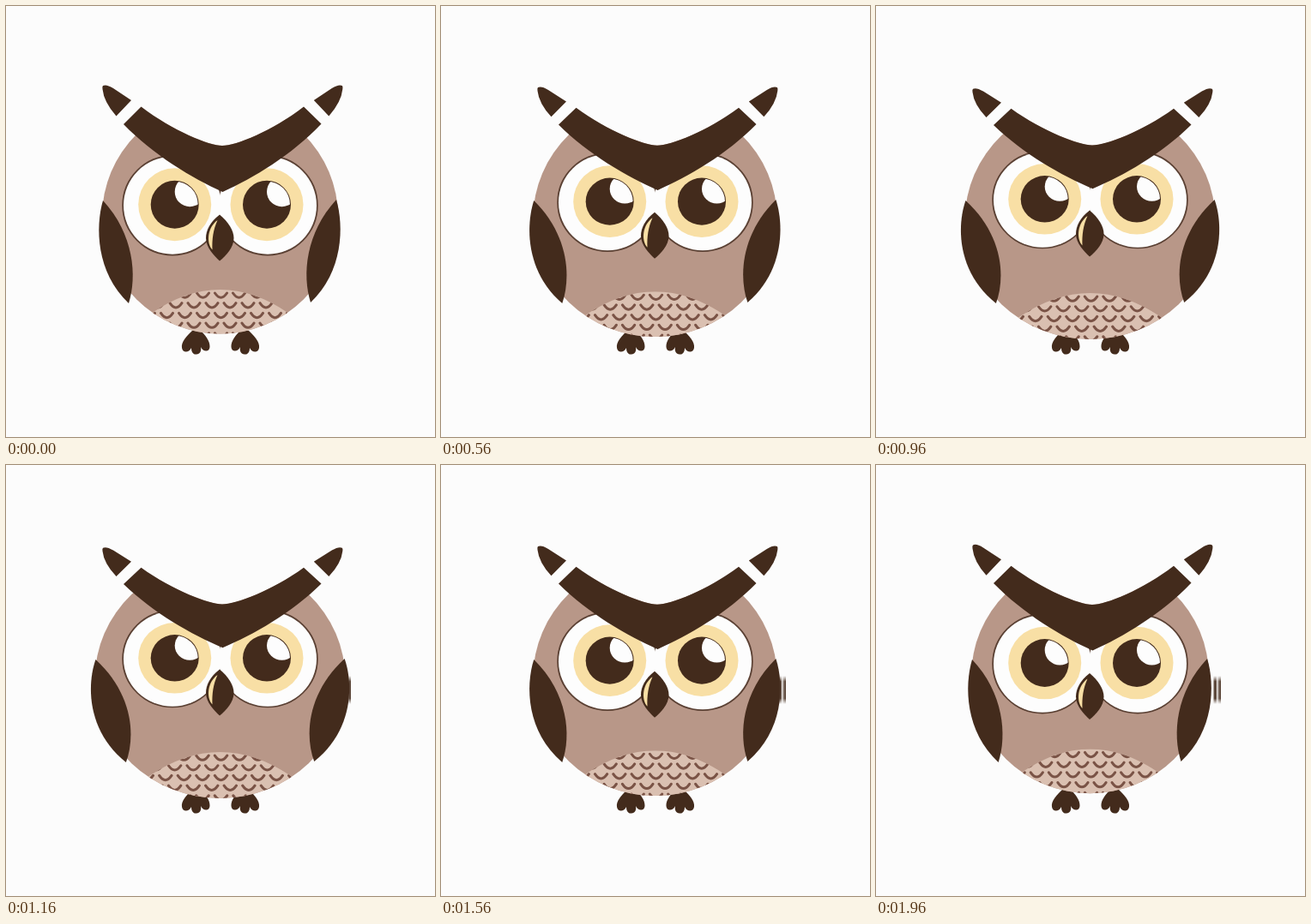
Recreate the animation shown at these times as an HTML page. Size 500 by 503 pixels, loop 2000 ms.

```html
<!DOCTYPE html>
<html lang="en">
<head>
<meta charset="utf-8">
<title>Breathing owl</title>
<style>
  html, body { margin: 0; width: 100%; height: 100%; overflow: hidden; background: #fcfcfc; }
  svg { display: block; width: 100vw; height: 100vh; }
  .dark { fill: #432b1c; }
  .cream { fill: #f8dfa5; }
  .white { fill: #fdfdfd; }
  .rim { fill: none; stroke: #5a4033; stroke-width: 3.4; }
  .scales { fill: none; stroke: #7a5346; stroke-width: 3; stroke-linecap: round; }
</style>
</head>
<body>
<svg viewBox="0 0 500 503">
  <defs>
    <clipPath id="bodyClip"><ellipse class="torso" cx="249.5"/></clipPath>
    <clipPath id="bellyClip"><path d="M151 373 Q160 365 169 359 Q249.5 303 330 359 Q340 365 349 373 V420 H151Z"/></clipPath>
    <clipPath id="pupilClip"><circle r="27"/></clipPath>
    <linearGradient id="fade" x2="0" y2="1">
      <stop offset="0" stop-color="#432b1c" stop-opacity="0"/>
      <stop offset=".2" stop-color="#432b1c"/>
      <stop offset=".8" stop-color="#432b1c"/>
      <stop offset="1" stop-color="#432b1c" stop-opacity="0"/>
    </linearGradient>
    <path id="foot" d="M217 379 C210 386 204 392 205 399 C206 405 213 405 216 399 C216 405 219 407 222 406.500 C226 406 228 403 227 398 C230 404 237 404 237.500 398 C238 391 232 384 227 379Z"/>
    <path id="ear" d="M113 93 Q117 91 125 96 L146 110 L128.500 128.500 Q114 112 112.500 97 Q112 94 113 93Z"/>
    <path id="wing" d="M5 -38C-4 -7 -3 46 35 82C45 50 41 1 5 -38Z"/>
    <g id="eye">
      <circle class="cream" r="42.500"/>
      <circle class="dark" r="28"/>
      <circle class="white" cx="17.500" cy="-15" r="17.500" clip-path="url(#pupilClip)"/>
    </g>
  </defs>

  <g class="dark">
    <use href="#foot"/>
    <use href="#foot" transform="translate(500) scale(-1 1)"/>
  </g>
  <g id="trail" fill="url(#fade)">
    <rect x="393.500" y="246" width="3.500" height="33" opacity=".85"/>
    <rect x="398" y="246" width="2" height="33" opacity=".5"/>
    <rect x="400" y="246" width="2" height="33" opacity=".85"/>
  </g>

  <ellipse class="torso" cx="249.500" fill="#b89788"/>
  <g clip-path="url(#bodyClip)">
    <g id="belly"><g clip-path="url(#bellyClip)">
      <rect x="150" y="320" width="200" height="90" fill="#dac0b1"/>
      <path id="scales" class="scales"/>
    </g></g>
  </g>

  <g class="dark">
    <use id="wingL" href="#wing"/>
    <use id="wingR" href="#wing"/>
  </g>

  <g id="eyes">
    <circle class="rim" cx="194" cy="232.700" r="57"/>
    <circle class="rim" cx="305" cy="232.700" r="57"/>
    <circle class="white" cx="194" cy="232.700" r="57"/>
    <circle class="white" cx="305" cy="232.700" r="57"/>
    <use href="#eye" x="196.700" y="231.700"/>
    <use href="#eye" x="304" y="231.700"/>
  </g>

  <g id="beak">
    <path class="dark" d="M249 243.500 C238 252 233 262 233 271 C233 282 243 292 249 297.500 C256 292 265.500 282 265.500 271 C265.500 262 259 252 249 243.500Z"/>
    <path class="cream" d="M246.500 250 C235 258 233 276 240.500 284.500 C240 272 241.500 261 246.500 250Z"/>
  </g>

  <g id="brow">
    <path fill="#fcfcfc" d="M157 118 C195 146 237 163 252 163 C268 163 310 146 347 118 V60 H157Z"/>
    <g class="dark">
      <path d="M157.500 117.500 C195 146 237 163 252 163 C268 163 310 146 347 117.500 L367.500 137.500 C333 174 288 201 252.500 217 C217 201 172 174 137 138Z"/>
      <use href="#ear"/>
      <use href="#ear" transform="translate(504.800) scale(-1 1)"/>
    </g>
  </g>
</svg>
<script>
  const LOOP = 2000, TICK = 40, STEP = 100;
  const $ = id => document.getElementById(id);
  const torsos = document.querySelectorAll('.torso');
  const move = (id, value) => $(id).setAttribute('transform', value);
  // Scale the height around a fixed line, then shift
  const squash = (y, s, dy) => `translate(0 ${y + dy}) scale(1 ${s}) translate(0 ${-y})`;

  function scalePattern() {
    let d = '';
    for (let row = 0; row < 5; row++) {
      const y = 335 + row * 11.7, shift = row % 2 ? 10.5 : 0;
      for (let n = -5; n <= 5; n++) {
        d += `M${243.5 + n * 21 + shift} ${y}q7 10.5 14 0`;
      }
    }
    return d;
  }

  function draw(t) {
    const tick = Math.floor(t / TICK) * TICK;
    const k = Math.max(0, Math.floor((tick - 30) / STEP));
    const u = 1 - Math.abs(k - 10) / 10;

    for (const e of torsos) {
      e.setAttribute('cy', 246 + 4 * u);
      e.setAttribute('rx', 137.5 + 9.3 * u);
      e.setAttribute('ry', 136.5 + 3.2 * u);
    }
    const w = 1 + 0.2 * u;
    move('wingL', `translate(${108 - 10.5 * u} 265) scale(${w} 1)`);
    move('wingR', `translate(${390 + 11.7 * u} 264) scale(${-w} 1)`);
    move('belly', `translate(249.5 ${4.5 * u}) scale(${1 + 0.03 * u} 1) translate(-249.5 0)`);
    move('eyes', squash(231.5, 1 - 0.032 * u, -7.1 * u));
    move('beak', `translate(0 ${-5.6 * u})`);
    move('brow', squash(163, 1 - 0.067 * u, -0.6 * u));
    $('trail').setAttribute('visibility', k > 10 ? 'visible' : 'hidden');
  }

  $('scales').setAttribute('d', scalePattern());
  const start = performance.now();
  function loop() {
    draw((performance.now() - start) % LOOP);
    requestAnimationFrame(loop);
  }
  loop();
</script>
</body>
</html>
```
